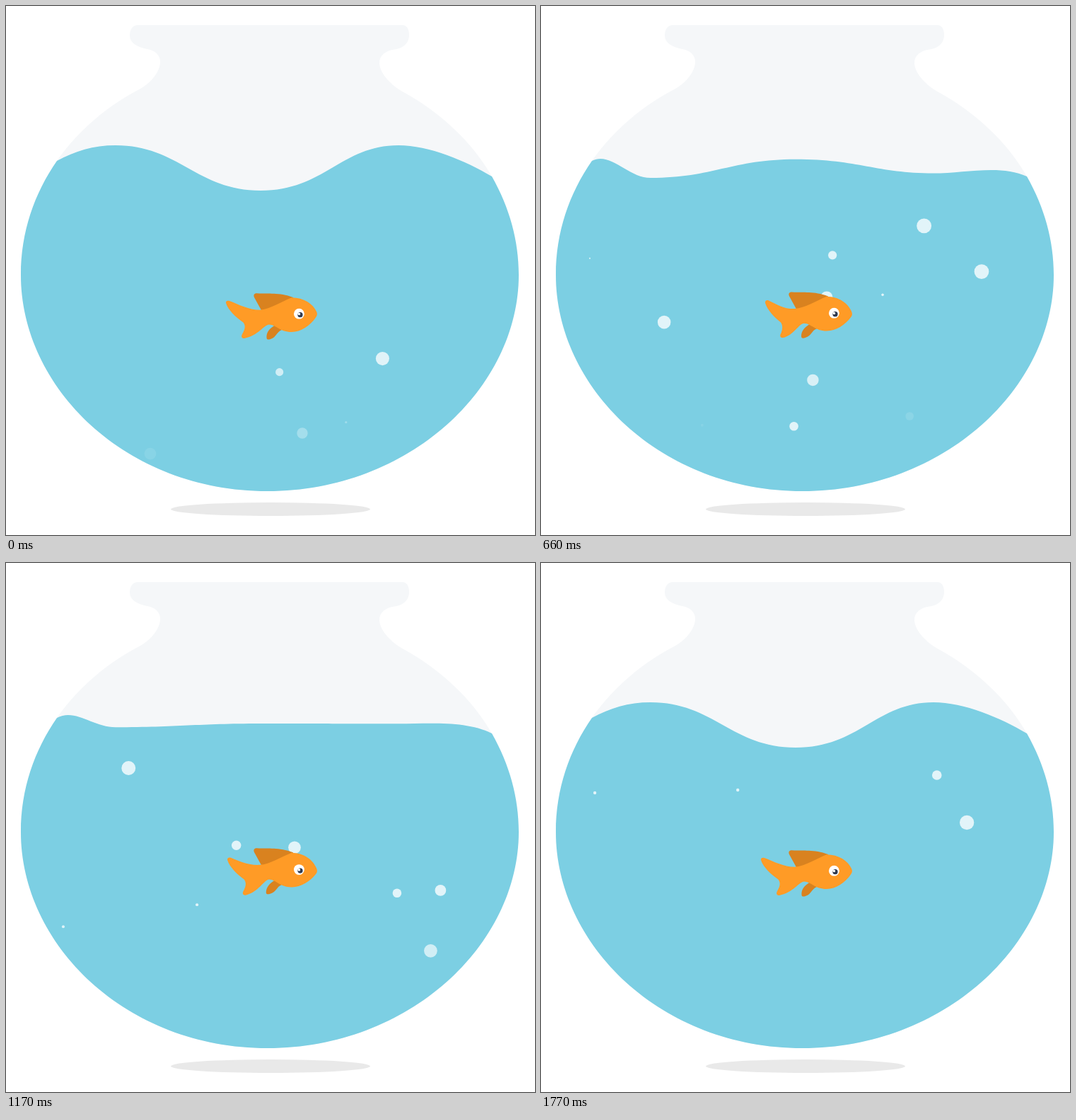
These frames come from a looping animation (748x748 px, 1800 ms). An HTML page with a canvas:

```html
<!DOCTYPE html>
<html lang="en">
<head>
<meta charset="utf-8">
<title>Fish bowl</title>
<style>
  html, body { margin: 0; width: 100%; height: 100%; overflow: hidden; background: #fff; }
  canvas { display: block; width: 748px; height: 748px; }
</style>
</head>
<body>
<canvas id="stage" width="748" height="748"></canvas>
<script>
const ctx = document.getElementById('stage').getContext('2d');
const LOOP = 1800, STEP = 30, SPAN = 1770;
const WATER = '#7ccfe3', BODY = '#ff9b26', FIN = '#d9821f';
const POP_Y = 260;

const glass = new Path2D(
  'M187 27H560C567 27 570 33 570 41C570 54 560 60 549 61.5C537 63 528 70 528 80' +
  'C528 94 542 109 557 119C610 147 658 190 687 241C712 285 725 332 725 380' +
  'C725 540 570 686 370 686C170 686 21 540 21 380C21 320 40 265 72 219' +
  'C103 175 145 140 190 117C206 108 218 92 218 79C218 70 212 63 200 61' +
  'C185 58 175 52 175 42C175 33 179 27 187 27Z');

// birth ms, final x, x offset at birth, virtual start y, speed px/ms, radius, settling ms
const bubbles = [
  [-400, 543, -37, 618.4, .29, 9, 160],
  [-340, 417, -78, 613.5, .261, 5.3, 180],
  [-160, 401.5, 28, 677.1, .323, 7.5, 170],
  [-140, 483.5, -4, 657.8, .311, 1.6, 180],
  [-50, 173.2, 40, 665.8, .308, 8.4, 95],
  [-100, 698, 0, 669.5, .55, 4.8, 120],
  [-100, 619, 50, 683, .404, 9.3, 150],
  [-100, 69, 0, 599.6, .319, .9, 150],
  [290, 414, -94, 627.7, .256, 7.8, 160],
  [250, 310, 116, 778.2, .41, 5.9, 230],
  [600, 561, -48, 627.6, .28, 5.8, 160],
  [830, 602.5, -6, 660.4, .312, 8.9, 160],
  [550, 598, 150, 707.2, .393, 7.2, 140],
  [615, 279.5, -60, 635.2, .272, 1.9, 150],
  [780, 75.6, 24, 640.8, .319, 1.9, 130]
];

// Linear interpolation through [time, value] pairs
function track(keys, t) {
  let i = 1;
  while (i < keys.length - 1 && t > keys[i][0]) i++;
  const [t0, a] = keys[i - 1], [t1, b] = keys[i];
  return a + (b - a) * (t - t0) / (t1 - t0);
}

const waveKeys = [[0, 0], [810, 1.13], [SPAN, 0]];
const bobKeys = [[0, 6], [443, 0], [885, 8.6], [1328, 0], [SPAN, 6]];
const tailKeys = [[0, 0], [177, 3], [354, 0], [708, 7], [1062, 0], [1416, 6.8], [SPAN, 0]];

function disc(x, y, r, color) {
  ctx.fillStyle = color;
  ctx.beginPath();
  ctx.arc(x, y, r, 0, Math.PI * 2);
  ctx.fill();
}

function drawBowl() {
  ctx.fillStyle = '#e9e9e9';
  ctx.beginPath();
  ctx.ellipse(374, 711.5, 141, 9.5, 0, 0, Math.PI * 2);
  ctx.fill();
  ctx.fillStyle = '#f5f7f9';
  ctx.fill(glass);
}

function drawWater(t) {
  const p = track(waveKeys, t);
  const left = 197 + 50 * p, mid = 261 - 48 * p, right = 197 + 43 * p;
  ctx.fillStyle = WATER;
  ctx.beginPath();
  ctx.moveTo(72, 219);
  ctx.bezierCurveTo(98, 205, 123, left, 155, left);
  ctx.bezierCurveTo(244, left, 270, mid, 360, mid);
  ctx.bezierCurveTo(450, mid, 474, right, 555, right);
  ctx.bezierCurveTo(598, right, 650, 219 + 5 * p, 687, 241);
  ctx.bezierCurveTo(712, 285, 725, 332, 725, 380);
  ctx.bezierCurveTo(725, 540, 570, 686, 370, 686);
  ctx.bezierCurveTo(170, 686, 21, 540, 21, 380);
  ctx.bezierCurveTo(21, 320, 40, 265, 72, 219);
  ctx.fill();
}

function drawBubbles(t) {
  ctx.save();
  ctx.clip(glass);
  for (const [birth, x, dx, y0, v, r, tau] of bubbles) {
    const s = t - birth;
    const y = y0 - v * s - v * tau * Math.exp(-s / tau);
    if (s <= 0 || y < POP_Y) continue;
    const alpha = Math.min(.78, .0019 * s);
    disc(x + dx * Math.exp(-s / tau / 2), y, r * (1 + .00015 * s), `rgba(255,255,255,${alpha})`);
  }
  ctx.restore();
}

function drawFish(t) {
  const d = track(bobKeys, t) - 6, q = track(tailKeys, t);

  // Pelvic fin
  ctx.fillStyle = FIN;
  ctx.beginPath();
  ctx.moveTo(381, 451 + d);
  ctx.bezierCurveTo(372, 456 + d, 368, 462 + d, 368.5 + d * .25, 469 + d * 1.1);
  ctx.bezierCurveTo(368.5 + d * .25, 472 + d * 1.1, 371 + d * .25, 472 + d * 1.1, 374 + d * .2, 471 + d * 1.1);
  ctx.bezierCurveTo(383, 468 + d, 382, 461 + d, 390, 458 + d);
  ctx.fill();

  // Dorsal fin
  ctx.beginPath();
  ctx.moveTo(362, 432 + d);
  ctx.lineTo(351, 412 + d);
  ctx.bezierCurveTo(349.5, 408.5 + d, 351, 406 + d, 355, 406.3 + d);
  ctx.bezierCurveTo(372, 407.5 + d, 385, 404.5 + d, 406, 412 + d * .9);
  ctx.lineTo(404, 418 + d);
  ctx.fill();

  // Body and tail
  ctx.fillStyle = BODY;
  ctx.beginPath();
  ctx.moveTo(316 + q, 417 - q * .1);
  ctx.bezierCurveTo(330 + q * .8, 422.5, 343, 429.5 + d * .6, 359, 429.8 + d);
  ctx.bezierCurveTo(373, 429 + d, 390, 418 + d, 404, 412.3 + d * .9);
  ctx.bezierCurveTo(421, 412.5 + d * .9, 434, 421 + d * .6, 439, 432 + d * .15);
  ctx.bezierCurveTo(440.7, 435, 440, 438, 438, 440.5 + d * .15);
  ctx.bezierCurveTo(430, 452 + d * .6, 417, 461 + d * .85, 404, 461 + d * .85);
  ctx.bezierCurveTo(387, 461 + d * .85, 383, 451 + d, 372, 450.5 + d);
  ctx.bezierCurveTo(365, 450.5 + d, 357, 466, 337 + q * .85, 470 - q * .15);
  ctx.bezierCurveTo(333 + q * .85, 470.3 - q * .15, 332 + q * .85, 467 - q * .15, 334.5 + q * .8, 463);
  ctx.bezierCurveTo(338 + q * .6, 457, 339 + q * .5, 452, 335.5 + q * .6, 447.5);
  ctx.bezierCurveTo(325 + q * .8, 440, 314 + q, 430, 311 + q, 420);
  ctx.bezierCurveTo(310.5 + q, 417 - q * .1, 313 + q, 416 - q * .1, 316 + q, 417 - q * .1);
  ctx.fill();

  // Eye
  const ey = 435.2 + d * .55;
  disc(414.4, ey, 7.4, '#fff');
  disc(416, ey + 1.5, 3.6, '#2f3a50');
  disc(414.4, ey + .3, 1.8, '#fff');
}

function frame(now) {
  const t = Math.floor((now % LOOP) / STEP) * STEP;
  ctx.fillStyle = '#fff';
  ctx.fillRect(0, 0, 748, 748);
  drawBowl();
  drawWater(t);
  drawBubbles(t);
  drawFish(t);
}

let start = null;
function tick(now) {
  if (start === null) start = now;
  frame(Math.max(0, now - start));
  requestAnimationFrame(tick);
}
frame(0);
requestAnimationFrame(tick);
</script>
</body>
</html>
```
